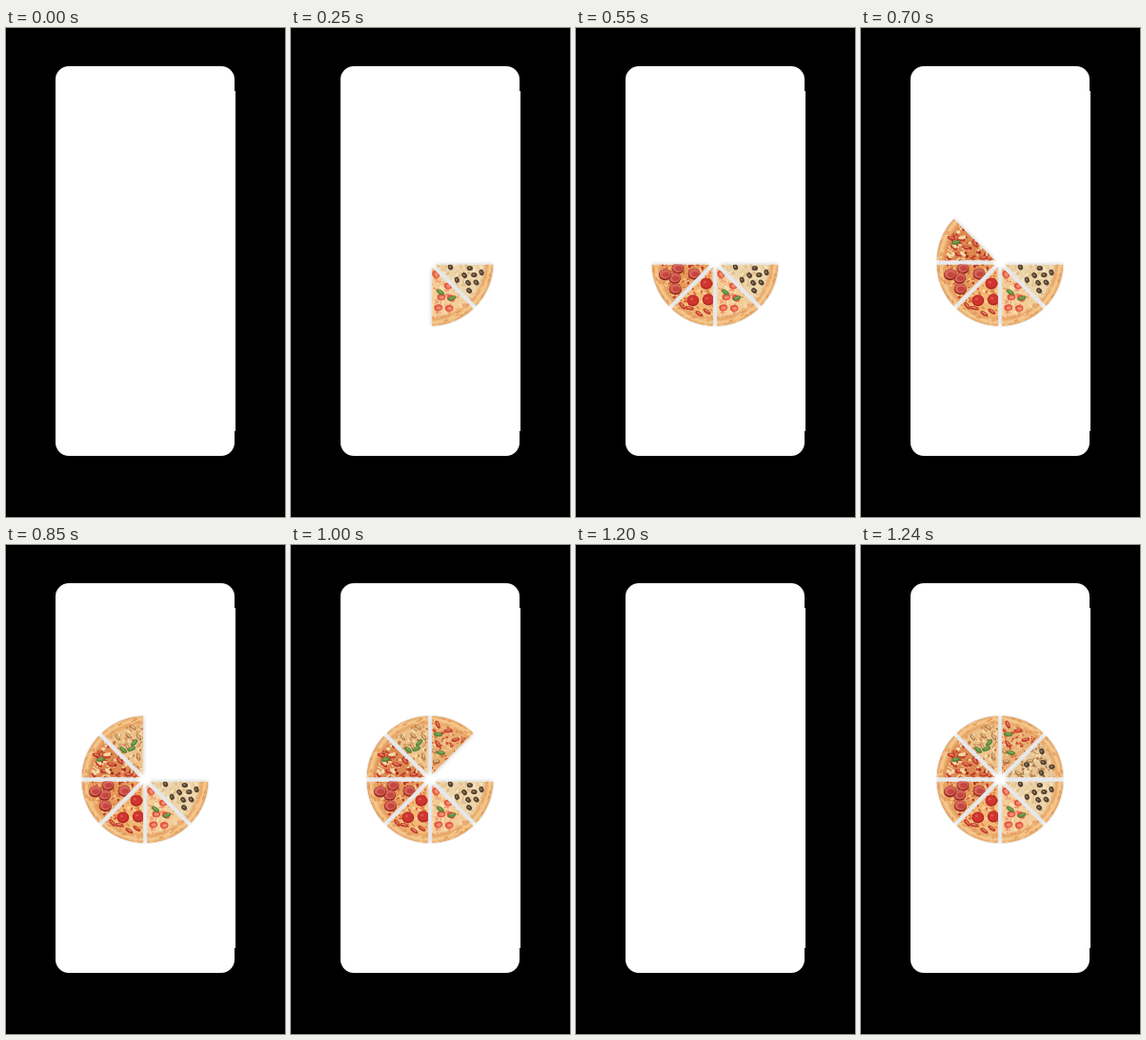
An HTML page with a canvas that plays this animation: 293x512 px, repeating every 2.06 s.

```html
<!DOCTYPE html>
<html lang="en">
<head>
<meta charset="utf-8">
<title>Pizza slices</title>
<style>
  html, body { margin: 0; width: 100%; height: 100%; overflow: hidden; background: #000; }
  canvas { display: block; width: 293px; height: 512px; }
</style>
</head>
<body>
<canvas id="stage" width="293" height="512"></canvas>
<script>
const ctx = document.getElementById('stage').getContext('2d');
const LOOP = 2060;
const CX = 146, CY = 245.5, RADIUS = 66.5, GAP = 2.2;
const SECTOR = Math.PI / 4;

// Slices run clockwise from three o'clock.
// Each topping has a kind, a count, its nearest and farthest distance, and a phase.
const SLICES = [
  { base: '#ecd5ac', specks: ['#f5e5c5', '#dfbd88', '#e9c992'],
    toppings: [['olive', 9, 22, 55, .2]] },
  { base: '#f3cd98', specks: ['#f9e2bd', '#ecac74', '#f0926e', '#f7d7a5'],
    toppings: [['tomato', 6, 14, 52, .4], ['basil', 2, 33, 44, .6]] },
  { base: '#f1b873', specks: ['#f8d69c', '#e28948', '#dc6238', '#f5c88a'],
    toppings: [['bacon', 4, 52, 57, .1], ['pepperoni', 3, 24, 46, .5]] },
  { base: '#e59a59', specks: ['#f4c88b', '#d2613a', '#b83b2b', '#efb474'],
    toppings: [['salami', 5, 25, 54, .3]] },
  { base: '#dc8850', specks: ['#f3cb92', '#bb3528', '#cf5036', '#f5dcae', '#a32a20'],
    toppings: [['bacon', 8, 18, 57, .3], ['cream', 4, 40, 54, .2], ['basil', 1, 51, 51, .55]] },
  { base: '#edc28a', specks: ['#f8dfb6', '#d99d62', '#c07c48', '#f3cf9c'],
    toppings: [['mushroom', 6, 25, 56, .7], ['basil', 3, 35, 40, .45]] },
  { base: '#e9b074', specks: ['#f6d5a2', '#d8753f', '#cd5433', '#f0c48c'],
    toppings: [['bacon', 4, 38, 58, .2], ['mushroom', 2, 20, 30, .4], ['basil', 2, 30, 48, .5]] },
  { base: '#e7c596', specks: ['#f4deb8', '#c5935c', '#a8713f', '#edd0a0'],
    toppings: [['mushroom', 5, 20, 54, .6], ['olive', 5, 32, 56, .3]] }
];

function randomFrom(seed) {
  return () => (seed = (seed * 16807) % 2147483647) / 2147483647;
}

function ellipse(c, x, y, rx, ry, color, turn = 0) {
  c.fillStyle = color;
  c.beginPath();
  c.ellipse(x, y, rx, ry, turn, 0, 7);
  c.fill();
}

const TOPPINGS = {
  olive(c, x, y, turn) {
    ellipse(c, x, y, 3.2, 2.5, '#54402f', turn);
    ellipse(c, x - .4, y - .3, 1.3, .8, '#a08a6c', turn);
  },
  tomato(c, x, y, turn) {
    ellipse(c, x, y, 4.4, 3.5, '#e4573e', turn);
    ellipse(c, x + .5, y + .3, 2.7, 1.8, '#f18e70', turn);
  },
  pepperoni(c, x, y) {
    ellipse(c, x, y, 6.3, 6.1, '#b02623');
    ellipse(c, x - .2, y - .4, 5.3, 5, '#d0352f');
    ellipse(c, x - 1.5, y - 1.5, 1.6, 1.2, '#dd5a4d');
  },
  salami(c, x, y) {
    ellipse(c, x, y, 6.5, 6, '#96261e');
    ellipse(c, x, y - .7, 5.8, 5, '#d4655a');
    ellipse(c, x + 1, y, 3.6, 2.6, '#c4453e');
  },
  bacon(c, x, y, turn) {
    ellipse(c, x, y, 4.5, 2, '#c03a2a', turn);
    ellipse(c, x, y - .5, 3, .7, '#e58c69', turn);
  },
  cream(c, x, y, turn) {
    ellipse(c, x, y, 3.6, 1.8, '#f5d8a0', turn);
  },
  mushroom(c, x, y, turn) {
    ellipse(c, x, y, 4, 1.8, '#b07a48', turn);
    ellipse(c, x, y - .5, 2.8, .9, '#e2bd8a', turn);
  },
  basil(c, x, y, turn) {
    ellipse(c, x, y, 4.6, 2.2, '#57853a', turn - .6);
    ellipse(c, x, y - .5, 3, .8, '#86aa58', turn - .6);
  }
};

function polar(index, share, dist) {
  const angle = (index + share) * SECTOR;
  return [CX + dist * Math.cos(angle), CY + dist * Math.sin(angle)];
}

function wedge(index) {
  const mid = (index + .5) * SECTOR;
  const half = SECTOR / 2 - Math.asin(GAP / RADIUS);
  const path = new Path2D();
  path.moveTo(...polar(index, .5, GAP / Math.sin(SECTOR / 2)));
  path.arc(CX, CY, RADIUS, mid - half, mid + half);
  path.closePath();
  return path;
}

function drawCrust(c, index, random) {
  const glow = c.createRadialGradient(CX, CY, 56, CX, CY, RADIUS);
  glow.addColorStop(0, 'rgba(232, 160, 92, 0)');
  glow.addColorStop(.35, '#e8a566');
  glow.addColorStop(.65, '#f6cc92');
  glow.addColorStop(1, '#e59f5c');
  c.fillStyle = glow;
  c.fill(wedge(index));
  for (let i = 0; i < 14; i++) {
    const [x, y] = polar(index, random(), 59 + 7 * random());
    ellipse(c, x, y, 2.5, .9, i % 2 ? '#f4c68c' : '#e39a5b', (index + .5) * SECTOR + Math.PI / 2);
  }
}

function drawSlice(c, slice, index) {
  const random = randomFrom(977 + index * 131);
  c.clip(wedge(index));
  c.fillStyle = slice.base;
  c.fill(wedge(index));
  for (let i = 0; i < 120; i++) {
    const [x, y] = polar(index, random(), 60 * Math.sqrt(random()));
    ellipse(c, x, y, .8 + 1.6 * random(), .6 + random(), slice.specks[i % slice.specks.length], random() * 3);
  }
  drawCrust(c, index, random);
  for (const [kind, count, near, far, phase] of slice.toppings) {
    for (let i = 0; i < count; i++) {
      const share = .14 + .72 * ((phase + i * .618) % 1);
      const dist = near + (far - near) * Math.sqrt(i / Math.max(1, count - 1));
      TOPPINGS[kind](c, ...polar(index, share, dist), random() * 1.6 - .3);
    }
  }
}

function drawShadow(index) {
  ctx.save();
  ctx.beginPath();
  ctx.arc(CX, CY, RADIUS + 1, 0, 7);
  ctx.clip();
  ctx.shadowColor = 'rgba(70, 75, 85, .36)';
  ctx.shadowBlur = 4;
  ctx.fillStyle = '#fff';
  ctx.fill(wedge(index));
  ctx.restore();
}

const layers = SLICES.map((slice, index) => {
  const layer = document.createElement('canvas');
  layer.width = 293;
  layer.height = 512;
  drawSlice(layer.getContext('2d'), slice, index);
  return layer;
});

function draw(count) {
  ctx.fillStyle = '#000';
  ctx.fillRect(0, 0, 293, 512);
  ctx.fillStyle = '#fff';
  ctx.beginPath();
  ctx.roundRect(52, 40, 188, 408, 14);
  ctx.rect(240, 66, 1, 356);
  ctx.fill();
  for (let i = 0; i < count; i++) drawShadow(i);
  for (let i = 0; i < count; i++) ctx.drawImage(layers[i], 0, 0);
}

// One slice every 150 ms, then the whole pizza blinks once.
function sliceCount(time) {
  const blink = time >= 1200 && time < 1240;
  return blink ? 0 : Math.min(SLICES.length, Math.floor((time + 50) / 150));
}

const start = performance.now();
let shown = -1;
function tick() {
  const count = sliceCount((performance.now() - start) % LOOP);
  if (count !== shown) draw(shown = count);
  requestAnimationFrame(tick);
}
tick();
</script>
</body>
</html>
```
